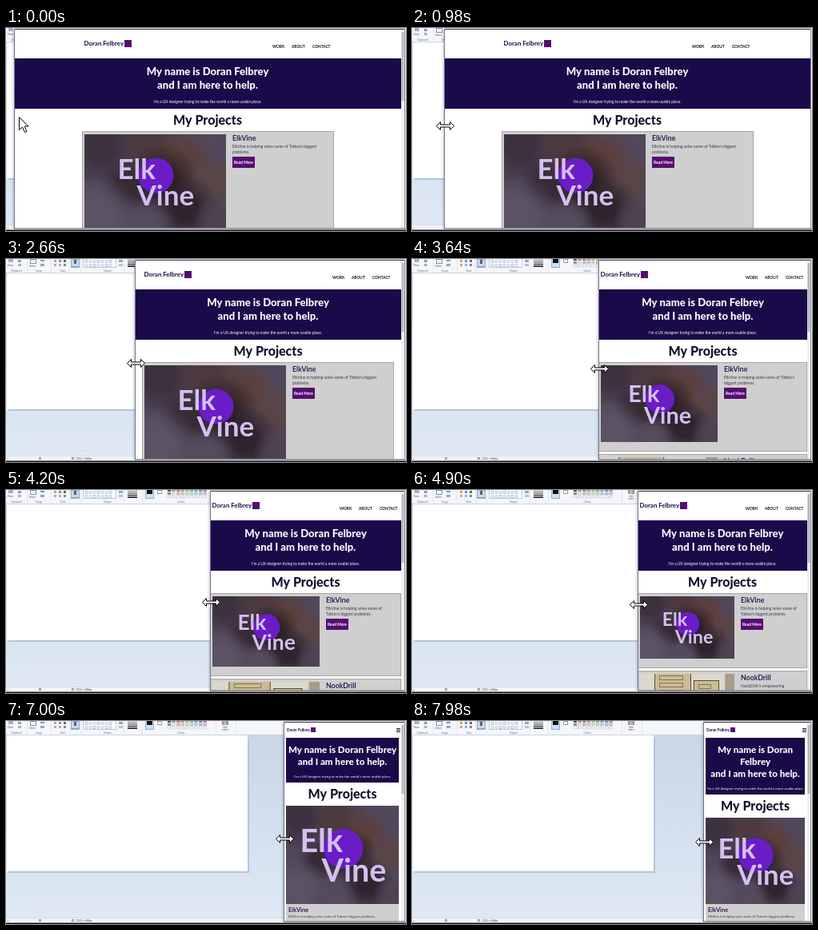
Animation, 500 px wide and 254 px high, one loop 8 s. Source, as an HTML page with a canvas:

```html
<!DOCTYPE html>
<html lang="en">
<head>
<meta charset="utf-8">
<title>Responsive portfolio</title>
<style>
  html, body { margin: 0; width: 100%; height: 100%; overflow: hidden; background: #fff; }
  canvas { display: block; width: 500px; height: 254px; }
</style>
</head>
<body>
<canvas id="stage"></canvas>
<script>
const W = 500, H = 254, LOOP = 8000, STEP = 140;
const SANS = 'Lato, "Open Sans", sans-serif';
const NAVY = '#1b0a4a', PURPLE = '#560d72', INK = '#15102c';
const NAME = 'Doran Felbrey';
const PITCH = "I'm a UX designer trying to make the world a more usable place.";
const BLURB = "ElkVine is helping solve some of Tattoo's biggest problems.";

const canvas = document.getElementById('stage');
const ctx = canvas.getContext('2d');
const dpr = window.devicePixelRatio || 1;
canvas.width = W * dpr;
canvas.height = H * dpr;

// time, window edge, pointer height
const DRAG = [
  [0, 10, 120], [560, 10, 121], [1680, 89, 123], [3640, 233, 137],
  [4900, 282, 143], [5740, 318, 146], [7000, 347, 147], [7980, 364, 151]
];

function sample(t, col) {
  let i = 1;
  while (i < DRAG.length - 1 && t > DRAG[i][0]) i++;
  const a = DRAG[i - 1], b = DRAG[i];
  const k = Math.min(1, (t - a[0]) / (b[0] - a[0]));
  return Math.round(a[col] + (b[col] - a[col]) * k);
}

function rect(x, y, w, h, fill) {
  ctx.fillStyle = fill;
  ctx.fillRect(x, y, w, h);
}

function frame(x, y, w, h, color) {
  ctx.strokeStyle = color;
  ctx.lineWidth = 1;
  ctx.strokeRect(x + 0.5, y + 0.5, w - 1, h - 1);
}

function disc(x, y, r, fill) {
  ctx.fillStyle = fill;
  ctx.beginPath();
  ctx.arc(x, y, r, 0, Math.PI * 2);
  ctx.fill();
}

function text(str, x, y, size, color, weight = 400, align = 'left') {
  ctx.font = `${weight} ${size}px ${SANS}`;
  ctx.textAlign = align;
  ctx.fillStyle = color;
  ctx.fillText(str, x, y);
}

function wrap(str, width, size) {
  ctx.font = `400 ${size}px ${SANS}`;
  const lines = [];
  let line = '';
  for (const word of str.split(' ')) {
    const next = line ? line + ' ' + word : word;
    if (line && ctx.measureText(next).width > width) {
      lines.push(line);
      line = word;
    } else line = next;
  }
  return lines.concat(line);
}

function clipped(x, y, w, h, draw) {
  ctx.save();
  ctx.beginPath();
  ctx.rect(x, y, w, h);
  ctx.clip();
  draw();
  ctx.restore();
}

function poly(points, x, y, fill, stroke) {
  ctx.beginPath();
  points.forEach(([px, py]) => ctx.lineTo(x + px, y + py));
  ctx.closePath();
  ctx.fillStyle = fill;
  ctx.fill();
  ctx.strokeStyle = stroke;
  ctx.lineWidth = 1;
  ctx.stroke();
}

function drawRibbon() {
  rect(0, 0, W, 17, '#f4f6fa');
  rect(0, 17, W, 1, '#c9d3e0');
  const groups = [['Clipboard', 13], ['Image', 41], ['Tools', 71], ['Shapes', 127], ['Colors', 219]];
  for (const [label, x] of groups) text(label, x, 16, 3.2, '#6d7686', 400, 'center');
  for (const x of [26, 56, 79, 93, 147, 170, 262, 287]) rect(x, 0, 0.6, 16, '#d5dce6');

  rect(3, 0, 6, 4, '#9fb2cb');
  text('Paste', 2, 9, 3, '#555');
  rect(15, 1, 4, 3, '#8d9bb0');
  rect(15, 6, 4, 3, '#a9b6c6');
  frame(30, 0, 8, 6, '#7d93b5');
  text('Select', 29, 10, 3, '#555');
  rect(43, 1, 5, 2, '#7f96b6');
  rect(43, 6, 5, 3, '#93a8c4');
  const tools = ['#c9a765', '#7b93b8', '#666', '#cfa0a0', '#9db4cd', '#888'];
  tools.forEach((fill, i) => rect(60 + i % 3 * 6, 1 + (i > 2) * 5, 3, 3, fill));

  rect(81, 0, 11, 11, '#c5d9ef');
  frame(81, 0, 11, 11, '#8eaed4');
  rect(85, 1, 3, 5, '#6b5a5a');
  text('Brushes', 86.5, 9.5, 2.6, '#444', 400, 'center');

  rect(96, 0, 42, 11, '#fff');
  frame(96, -1, 42, 12, '#b8c7da');
  ctx.strokeStyle = '#7f99bf';
  ctx.lineWidth = 0.6;
  for (let i = 0; i < 14; i++) {
    const x = 99 + i % 7 * 5, y = 2 + (i > 6) * 5;
    ctx.beginPath();
    if (i % 3) ctx.arc(x + 1.5, y + 1, 1.5, 0, 7);
    else ctx.rect(x, y - 0.5, 3, 3);
    ctx.stroke();
  }
  rect(141, 1, 5, 3, '#8ca6c7');
  rect(141, 6, 5, 3, '#b3c2d5');
  for (let i = 0; i < 4; i++) rect(152, 1 + i * 2.4, 12, 0.6 + i * 0.4, '#333');

  rect(174, -1, 11, 12, '#cfe0f3');
  frame(174, -1, 11, 12, '#8eaed4');
  rect(176, 0, 7, 5, '#111');
  rect(189, 0, 6, 5, '#fff');
  frame(189, 0, 6, 5, '#999');
  const hues = [0, 0, 0, 25, 52, 130, 200, 230, 285];
  for (let i = 0; i < 27; i++) {
    const c = i % 9, row = Math.floor(i / 9);
    const fill = row === 2 ? '#f3f5f8'
      : c < 2 ? `hsl(0 0% ${25 + c * 35 + row * 30}%)`
      : `hsl(${hues[c]} 35% ${row ? 78 : 60}%)`;
    rect(202 + c * 5.6, row * 4 - 1, 4, 3, fill);
    ctx.strokeStyle = '#aab3c0';
    ctx.lineWidth = 0.4;
    ctx.strokeRect(202 + c * 5.6, row * 4 - 1, 4, 3);
  }
  for (let i = 0; i < 4; i++) rect(270 + i * 2, 0, 2, 5, `hsl(${i * 85} 40% 65%)`);
  text('Edit', 274, 8.5, 3, '#555', 400, 'center');
  text('colors', 274, 12, 3, '#555', 400, 'center');
}

function drawEditor() {
  const bg = ctx.createLinearGradient(0, 18, 0, 246);
  bg.addColorStop(0, '#c8d6e7');
  bg.addColorStop(1, '#dfe9f5');
  rect(0, 0, W, H, bg);
  drawRibbon();
  rect(3, 188, 301, 2, '#b5c5d9');
  rect(302, 21, 2, 168, '#b5c5d9');
  rect(1, 18, 301, 170, '#fff');
  rect(0, 246, W, 7, '#f1f4f8');
  rect(0, 246, W, 0.6, '#c4cfdc');
  text('+', 1, 251, 4, '#555');
  frame(41, 248, 3, 3, '#8a94a3');
  frame(82, 248, 3, 3, '#8a94a3');
  text('1152 × 648px', 87, 251, 3.3, '#444');
}

function glow(x, y, r, color) {
  const g = ctx.createRadialGradient(x, y, r * .35, x, y, r);
  g.addColorStop(0, `rgba(${color},.9)`);
  g.addColorStop(1, `rgba(${color},0)`);
  disc(x, y, r, g);
}

function drawHero(x, y, w, h, s) {
  clipped(x, y, w, h, () => {
    rect(x, y, w, h, '#51475a');
    const blobs = [
      [.12, .12, .3, '58,47,60'], [.45, .12, .26, '76,56,60'], [.9, .15, .22, '82,72,92'],
      [.7, .3, .24, '92,62,56'], [.9, .5, .2, '90,68,70'], [.55, .5, .26, '40,29,37'],
      [.3, .55, .2, '52,40,50'], [.72, .8, .24, '44,33,42'], [.1, .85, .28, '92,84,102'],
      [.45, .95, .18, '84,76,94'], [.95, .9, .18, '78,66,82']
    ];
    for (const [u, v, r, color] of blobs) glow(x + u * w, y + v * h, r * w, color);
    const cx = x + w / 2, cy = y + h / 2;
    disc(cx + s, cy - 7 * s, 22 * s, '#6a1cc6');
    text('Elk', cx - 47 * s, cy - 3 * s, 35 * s, '#d3c0f0', 700);
    text('Vine', cx - 23 * s, cy + 30 * s, 35 * s, '#d3c0f0', 700);
  });
}

function drawSketches(x, y, w, h) {
  clipped(x, y, w, h, () => {
    rect(x, y, w, h, '#dcd8ce');
    const u = w / 118;
    for (const [px, py, pw] of [[18, -3, 46], [67, 8, 32]]) {
      rect(x + px * u, y + py, pw * u, h, '#cbbd91');
      frame(x + px * u, y + py, pw * u, h, '#5d4c3a');
      for (let i = 0; i < 4; i++) frame(x + (px + 6) * u, y + py + 5 + i * 9, (pw - 16) * u, 6, '#857354');
    }
    rect(x + w * .9, y, w * .1, h, '#a99c86');
  });
}

function drawCard(x, y, w, h, title, blurb, imgW) {
  rect(x, y, w, h, '#cfcfcf');
  frame(x, y, w, h, '#a6a6a6');
  const tx = x + imgW + 11;
  text(title, tx, y + 12.3, 8.8, NAVY, 600);
  const lines = wrap(blurb, x + w - 10 - tx, 5);
  lines.forEach((line, i) => text(line, tx, y + 20.5 + i * 7.2, 5, '#3b3548'));
  const by = y + 18 + lines.length * 7;
  rect(tx, by, 28, 14, PURPLE);
  text('Read More', tx + 14, by + 8.8, 4.9, '#fff', 700, 'center');
}

function drawWide(left, right) {
  const cx = (left + right) / 2;
  const cw = Math.min(315, right - left);
  const x = Math.round(cx - cw / 2), end = x + cw;
  text(NAME, x + 2.5, 22, 7.9, NAVY, 700);
  rect(x + 53, 15, 9, 9, PURPLE);
  [['WORK', 77], ['ABOUT', 53], ['CONTACT', 27]].forEach(([label, dx]) =>
    text(label, end - dx, 24.8, 4.8, INK, 700));

  rect(left, 38, right - left, 63, NAVY);
  text('My name is ' + NAME, cx, 59, 13.1, '#fff', 800, 'center');
  text('and I am here to help.', cx, 76, 13.1, '#fff', 800, 'center');
  text(PITCH, cx, 94, 4.85, '#fff', 400, 'center');
  text('My Projects', cx, 121, 16, INK, 800, 'center');

  const tall = cw < 195;
  const iw = Math.round((cw - 6) * .573);
  const ih = Math.round(iw * (tall ? .87 : .66));
  const ch = ih + 16, next = 129 + ch + 3;
  drawCard(x, 129, cw, ch, 'ElkVine', BLURB, iw);
  drawHero(x + 3, 133, iw, ih, iw / (tall ? 125 : 177));
  drawCard(x, next, cw, ch, 'NookDrill', 'NookDrill is empowering students to learn together.', iw);
  drawSketches(x + 3, next + 4, iw, ih);
}

function drawNarrow(left, right) {
  const cx = (left + right) / 2;
  const x = left + 3, w = right - left - 6;
  text(NAME, x + 1, 12.8, 4.6, NAVY, 700);
  rect(x + 31, 8, 6, 6, PURPLE);
  for (let i = 0; i < 3; i++) rect(right - 6, 9 + i * 2, 5, 1, INK);

  const title = w < 138
    ? ['My name is ' + NAME.split(' ')[0], NAME.split(' ')[1], 'and I am here to help.']
    : ['My name is ' + NAME, 'and I am here to help.'];
  const extra = (title.length - 2) * 15;
  rect(x, 21, w, 56 + extra, NAVY);
  title.forEach((line, i) => text(line, cx, 40 + i * 15, 11.6, '#fff', 800, 'center'));
  text(PITCH, cx, 71 + extra, 4.35, '#fff', 400, 'center');
  text('My Projects', cx, 97 + extra, 16, INK, 800, 'center');

  const y = 106 + extra, h = Math.round(w * .873);
  rect(x, y, w, h + 60, '#cfcfcf');
  drawHero(x, y, w, h, w / 125);
  text('ElkVine', x + 3, y + h + 9.5, 7.6, NAVY, 600);
  text(BLURB, x + 3, y + h + 16.5, 4.25, '#3b3548');
}

function drawBrowser(left) {
  for (let i = 1; i < 4; i++) rect(left - i, 2, 1, 249, `rgba(60,70,100,${.2 / i})`);
  rect(left, 0, 498 - left, 251, '#fff');
  const scrolls = left < 13 || left > 160;
  const right = scrolls ? 494 : 498;
  clipped(left, 0, 498 - left, 250.5, () => {
    if (left > 332) drawNarrow(left, right);
    else drawWide(left, right);
  });
  if (scrolls) {
    rect(494, 2, 4, 249, '#efefef');
    rect(494.5, 5, 3, 86, '#b9b9bd');
  }
  rect(left, 0, W - left, 1, '#e9e9ee');
  rect(left, 1, 498 - left, 1, '#3a3548');
  rect(left, 1, 1, 250, '#77738a');
  rect(498, 1, 1, 250, '#8d8a99');
  rect(left, 250.5, 499 - left, 1, '#555160');
  rect(499, 0, 1, 252, '#eef1f6');
}

const ARROW = [[0, 0], [0, 16], [4, 12.5], [7, 19], [9.5, 18], [6.8, 11.5], [11.5, 11.5]];
const RESIZE = [[-11, 0], [-6, -5], [-6, -1.5], [6, -1.5], [6, -5], [11, 0],
  [6, 5], [6, 1.5], [-6, 1.5], [-6, 5]];

function drawPointer(t, left) {
  if (t < 420) {
    const k = t / 420;
    poly(ARROW, 16.5 - 5 * k, 111.5 + 7 * k, '#fff', '#000');
  } else poly(RESIZE, left + 1.5, sample(t, 2) + 0.5, '#fff', '#000');
}

function render(now) {
  // the drag pauses for one step near the end
  let step = Math.floor(now % LOOP / STEP);
  if (step === 55) step = 54;
  const t = step * STEP, left = sample(t, 1);
  ctx.setTransform(dpr, 0, 0, dpr, 0, 0);
  drawEditor();
  drawBrowser(left);
  rect(0, 252.5, W, 1.5, '#16131c');
  drawPointer(t, left);
}

const start = performance.now();
function tick() {
  render(performance.now() - start);
  requestAnimationFrame(tick);
}
tick();
</script>
</body>
</html>
```
